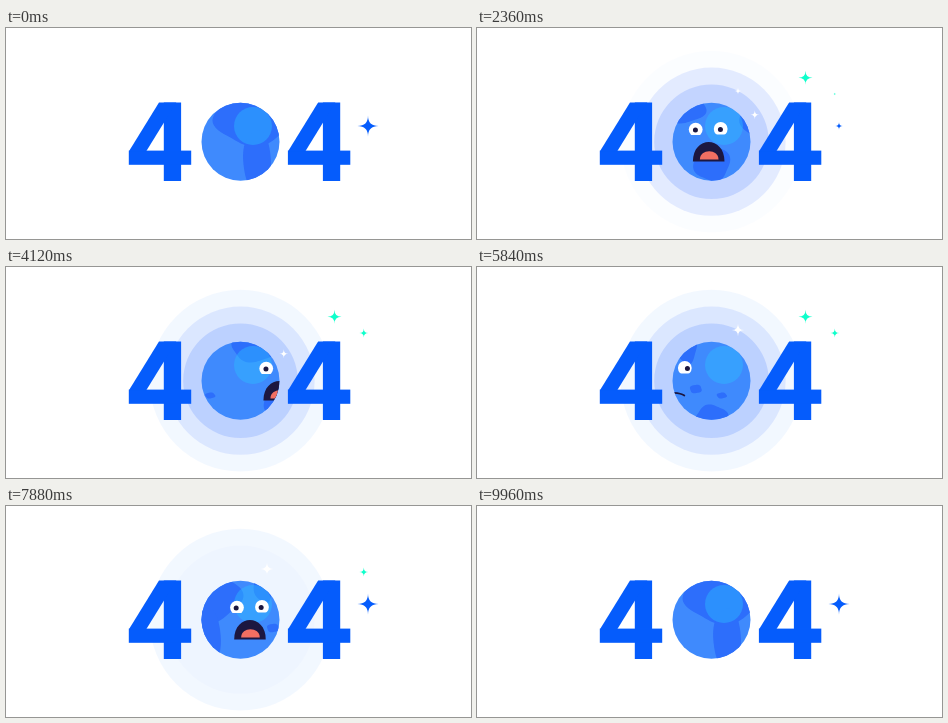
An HTML page with a canvas for the animation above (10000 ms loop, 465 px wide and 211 px high).

```html
<!DOCTYPE html>
<html lang="en">
<head>
<meta charset="utf-8">
<title>404</title>
<style>
  html, body { margin: 0; width: 100%; height: 100%; overflow: hidden; background: #fff; }
  canvas { display: block; width: 465px; height: 211px; }
</style>
</head>
<body>
<canvas width="465" height="211" role="img" aria-label="404"></canvas>
<script>
const canvas = document.querySelector('canvas');
const ctx = canvas.getContext('2d');
const LOOP = 10000, TURN = LOOP / 2, FADE = 1000, STEP = 40;
const STRIP = 236; // pixels the surface travels per loop
const GLOBE = { x: 234.5, y: 113.7, r: 39 };
const COLORS = {
  digit: '#055cfc', ocean: '#3f8afd', land: '#2d6efb', glow: 'rgba(44,190,255,0.42)',
  ink: '#1c1740', tongue: '#f26f62', teal: '#0effcb', white: '#fff'
};

const clamp = v => Math.max(0, Math.min(1, v));
const smooth = v => v * v * (3 - 2 * v);
const mix = (a, b, k) => a + (b - a) * k;
const wrap = t => (t + LOOP) % LOOP;

// Cyclic visibility: eases in from `on`, eases out from `off`.
function presence(t, on, off) {
  const age = wrap(t - on);
  const leaving = clamp((age - wrap(off - on)) / FADE);
  return smooth(clamp(age / FADE)) * (1 - leaving) ** 2;
}

function disc(x, y, r, color) {
  ctx.fillStyle = color;
  ctx.beginPath();
  ctx.arc(x, y, r, 0, Math.PI * 2);
  ctx.fill();
}

function drawRings(t) {
  for (let i = 2; i >= 0; i--) {
    const alpha = (0.14 - 0.045 * i) * presence(t, i * FADE, 6280 + i * FADE);
    disc(GLOBE.x, GLOBE.y, 57.3 + 16.8 * i, `rgba(0,${70 + 20 * i * i - 20 * i},255,${alpha})`);
  }
}

function drawFour(x) {
  const top = 74.5, bar = 122.6, slant = 30.2, thick = 17.3;
  ctx.fillStyle = COLORS.digit;
  ctx.fillRect(x + 35, top, thick, 78.5);
  ctx.fillRect(x, bar, 62.4, 14.2);
  ctx.beginPath();
  ctx.moveTo(x + slant, top);
  ctx.lineTo(x + slant + thick, top);
  ctx.lineTo(x + thick, bar + 1);
  ctx.lineTo(x, bar + 1);
  ctx.fill();
}

// Four-pointed star: the sides curve in towards the centre.
function drawStar(x, y, radius, color, scale) {
  const r = radius * scale;
  ctx.fillStyle = color;
  ctx.beginPath();
  ctx.moveTo(x, y - r);
  for (let i = 0; i < 4; i++) {
    const angle = i * Math.PI / 2;
    ctx.quadraticCurveTo(x, y, x + r * Math.cos(angle), y + r * Math.sin(angle));
  }
  ctx.fill();
}

function drawStars(t) {
  drawStar(328.5, 49.7, 7, COLORS.teal, presence(t, 0, 6000));
  drawStar(357.8, 66, 4.5, COLORS.teal, presence(t, 2000, 8200));
  drawStar(261, 63, 6.5, COLORS.white, presence(t, 4950, 2100));
  drawStar(277.8, 86.7, 4.5, COLORS.white, presence(t, 0, 4950));
  drawStar(362, 98, 10.5, COLORS.digit, presence(t, 6300, 1950));
}

// Rounded land mass with a gently wavy shore.
function land(x, y, rx, ry, wave = 0.07) {
  ctx.fillStyle = COLORS.land;
  ctx.beginPath();
  for (let a = 0; a < Math.PI * 2; a += 0.1) {
    const k = 1 + wave * Math.sin(4 * a + x);
    ctx.lineTo(x + rx * k * Math.cos(a), y + ry * k * Math.sin(a));
  }
  ctx.fill();
}

function drawSurface() {
  land(247, 91, 38, 26);
  land(251, 132, 14, 30, 0.03);
  land(179, 135, 18, 18);
  land(151, 80, 22, 15);
  land(72, 79, 10, 18);
  land(97, 151, 16, 13);
  land(81, 122, 6, 4.3);
  land(107, 128.5, 5, 3);
}

function dome(x, top, bottom, half, color) {
  const lift = top - (bottom - top) / 3;
  ctx.fillStyle = color;
  ctx.beginPath();
  ctx.moveTo(x - half, bottom);
  ctx.bezierCurveTo(x - half, lift, x + half, lift, x + half, bottom);
  ctx.fill();
}

function drawEye(x, y, look) {
  ctx.save();
  ctx.beginPath();
  ctx.rect(x - 8, y - 8, 16, 13.5);
  ctx.clip();
  disc(x, y, 6.9, COLORS.white);
  disc(x + look, y + 0.4, 2.5, COLORS.ink);
  ctx.restore();
}

function drawFace(x, t) {
  const open = smooth(clamp((t - 1950) / 350));
  const look = 2.6 * Math.cos((t - 3240) / 1200 * Math.PI * 2);
  drawEye(x - 25, 101.6, look);
  drawEye(x, 101, look);
  if (open > 0) {
    dome(x - 12, mix(126, 114, open), mix(127, 133.5, open), mix(11.5, 15.8, open), COLORS.ink);
    dome(x - 11.5, mix(127, 123.3, open), mix(127, 131.5, open), 9.3 * open, COLORS.tongue);
    return;
  }
  ctx.strokeStyle = COLORS.ink;
  ctx.lineWidth = 1.7;
  ctx.lineCap = 'round';
  ctx.beginPath();
  ctx.moveTo(x - 23.5, 126.7);
  ctx.bezierCurveTo(x - 16, 125.3, x - 5, 125.3, x - 0.5, 128.5);
  ctx.stroke();
}

function drawGlobe(t) {
  const shift = t / LOOP * STRIP;
  ctx.save();
  ctx.beginPath();
  ctx.arc(GLOBE.x, GLOBE.y, GLOBE.r, 0, Math.PI * 2);
  ctx.clip();
  disc(GLOBE.x, GLOBE.y, GLOBE.r + 1, COLORS.ocean);
  for (const offset of [shift, shift - STRIP]) {
    ctx.save();
    ctx.translate(offset, 0);
    drawSurface();
    ctx.restore();
  }
  disc(247, 98, 19, COLORS.glow);
  const pass = t % TURN;
  drawFace(188 + pass / LOOP * STRIP, pass);
  ctx.restore();
}

function draw(t) {
  ctx.fillStyle = COLORS.white;
  ctx.fillRect(0, 0, canvas.width, canvas.height);
  drawRings(t);
  drawFour(122.8);
  drawFour(281.9);
  drawGlobe(t);
  drawStars(t);
}

const start = performance.now();
function tick() {
  const t = (performance.now() - start) % LOOP;
  draw(Math.floor(t / STEP) * STEP);
  requestAnimationFrame(tick);
}
tick();
</script>
</body>
</html>
```
